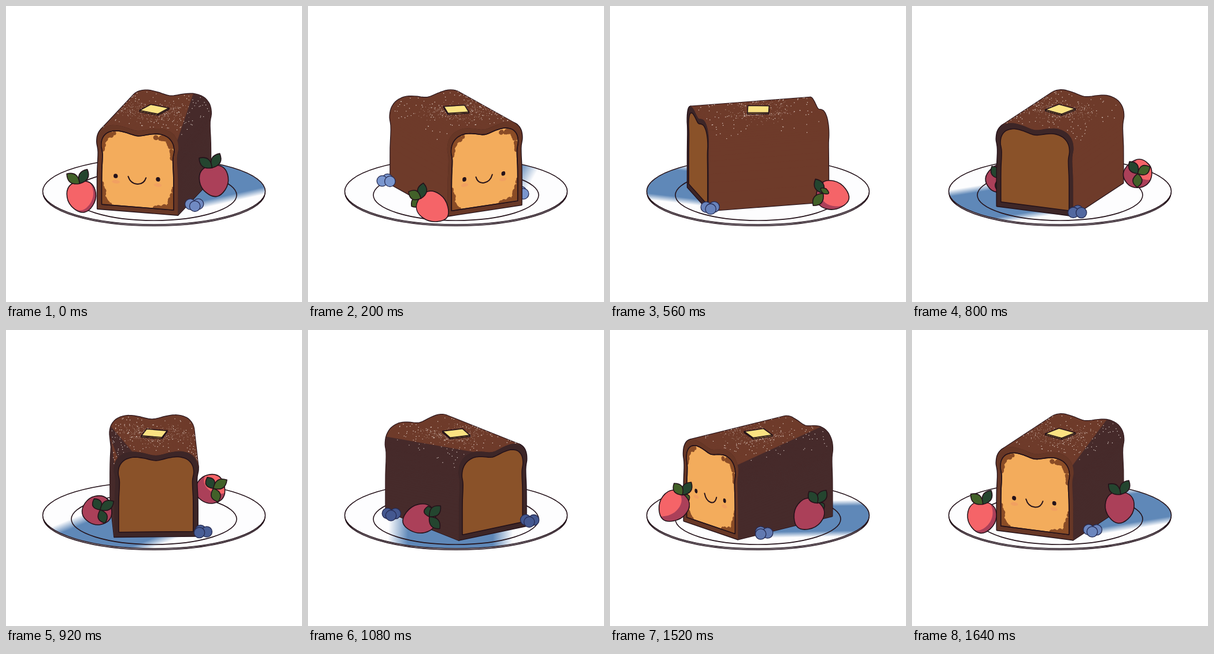
Recreate the animation shown at these times as an HTML page. Size 512 by 512 pixels, loop 1680 ms.

```html
<!DOCTYPE html>
<html lang="en">
<head>
<meta charset="utf-8">
<title>Loaf cake on a plate</title>
<style>
html, body { margin: 0; width: 100%; height: 100%; overflow: hidden; background: #fff; }
svg { display: block; width: 100vw; height: 100vh; }
.ink { stroke: #24121a; stroke-width: 1.6; stroke-linejoin: round; stroke-linecap: round; }
.rim { stroke-width: 2.8; }
.thin { vector-effect: non-scaling-stroke; }
</style>
</head>
<body>
<svg viewBox="0 0 512 512">
  <defs>
    <clipPath id="plateClip"><ellipse cx="256" cy="320.5" rx="192" ry="57"/></clipPath>
    <clipPath id="crumbClip"><path id="crumbShape"/></clipPath>
    <linearGradient id="soft" gradientUnits="userSpaceOnUse" x1="-116" x2="100" y1="0" y2="0">
      <stop offset="0" stop-color="#5f88b8" stop-opacity="0"/>
      <stop offset=".16" stop-color="#5f88b8"/>
      <stop offset=".84" stop-color="#5f88b8"/>
      <stop offset="1" stop-color="#5f88b8" stop-opacity="0"/>
    </linearGradient>
  </defs>
  <ellipse class="ink" cx="256" cy="323" rx="192" ry="57.3" fill="#e9ebf5"/>
  <ellipse cx="256" cy="320.5" rx="192.5" ry="57.5" fill="#fdfdfe"/>
  <g clip-path="url(#plateClip)">
    <g id="shade"><rect x="-116" y="0" width="216" height="320" transform="rotate(-143)" fill="url(#soft)"/></g>
  </g>
  <ellipse class="ink" cx="256" cy="320.5" rx="192.5" ry="57.5" fill="none"/>
  <ellipse class="ink" cx="256" cy="327" rx="143" ry="44" fill="none"/>
  <g id="behind"></g>
  <g id="body"></g>
  <g id="front">
    <path class="ink thin crumb" fill="#f3ac5c"/>
    <g id="toast" fill="#8a4c26" clip-path="url(#crumbClip)"></g>
    <path class="ink thin crumb" fill="none"/>
    <g fill="#f0906a" opacity=".4">
      <ellipse cx="-39" cy="-49" rx="7" ry="3"/><ellipse cx="36" cy="-49" rx="7" ry="3"/>
    </g>
    <g fill="#24121a">
      <circle cx="-39.5" cy="-59" r="3.8"/><circle cx="36.5" cy="-59" r="3.8"/>
    </g>
    <path class="ink thin" style="stroke-width:2" d="M-17-60Q-13-48-1-48T15-60" fill="none"/>
  </g>
  <g id="back"><path class="ink thin crumb" fill="#8a5229"/></g>
  <g id="topping"></g>
  <g id="ahead"></g>
</svg>
<script>
const $ = id => document.getElementById(id);
const TILT = 0.291, RISE = 0.957, CX = 256, CY = 326, HALF = 107, WIDE = 72;
const rad = d => d * Math.PI / 180;
const n1 = v => v.toFixed(1);
const poly = pts => 'M' + pts.map(p => n1(p[0]) + ' ' + n1(p[1])).join('L') + 'Z';

let seed = 7;
const rnd = () => (seed = seed * 16807 % 2147483647) / 2147483647;
const bell = () => (rnd() + rnd() + rnd() - 1.5) * 2;

// Cross-section of the loaf, left base over the two lobes to the right base
const left = [[-WIDE, 0], [-WIDE, 60], [-70.5, 98], [-73, 116], [-70, 131], [-60, 142], [-43, 147], [-24, 145]];
const knots = [...left, [0, 140], ...left.map(p => [-p[0], p[1]]).reverse()];
const SUB = 5;
const profile = [];
for (let i = 0; i < knots.length - 1; i++) {
  const [a, b, c, d] = [-1, 0, 1, 2].map(k => knots[Math.min(Math.max(i + k, 0), knots.length - 1)]);
  for (let j = 0; j < SUB; j++) {
    const t = j / SUB;
    profile.push([0, 1].map(k => b[k] + t * ((c[k] - a[k]) + t * ((2 * a[k] - 5 * b[k] + 4 * c[k] - d[k])
      + t * (3 * b[k] - a[k] - 3 * c[k] + d[k]))) / 2));
  }
}
profile.push(knots[knots.length - 1]);
const LAST = profile.length - 1;

function at(s) {
  const i = Math.min(Math.floor(s), LAST - 1), t = s - i, a = profile[i], b = profile[i + 1];
  return [a[0] + (b[0] - a[0]) * t, a[1] + (b[1] - a[1]) * t];
}

const crumb = poly(profile.map(([u, h]) => [u * 0.895, -8 - h * 0.88]));
$('crumbShape').setAttribute('d', crumb);
document.querySelectorAll('.crumb').forEach(e => e.setAttribute('d', crumb));

// Toasted corners: [side, height, reach across, reach along]
let toast = '';
for (const [u, h, du, dh] of [[-63, 133, 26, 32], [63, 131, 34, 38], [-64, 8, 16, 38], [64, 8, 36, 38]]) {
  for (let i = 0; i < 26; i++) {
    const across = i % 2, k = rnd(), off = rnd() * 9 * (1 - k);
    const x = u - Math.sign(u) * (across ? k * du : off);
    const y = h + (h > 50 ? -1 : 1) * (across ? off : k * dh);
    toast += `<circle cx="${n1(x)}" cy="${n1(-y)}" r="${n1(1.5 + rnd() * 2.5 + (1 - k) * 3)}"/>`;
  }
}
$('toast').innerHTML = toast;

// Sugar: coarse grains all over the top, fine powder near the butter
const grains = [], powder = [];
for (let i = 0; i < 130; i++) grains.push([17 + rnd() * 46, (rnd() * 2 - 1) * 102]);
for (let i = 0; i < 300; i++) powder.push([40 + bell() * 6.5, bell() * 25]);

let phi, cos, sin;
const project = (u, h, f) => [CX + u * cos + f * sin, CY + TILT * (f * cos - u * sin) - h];

function faces(a, b) {
  return (b[0] - a[0]) * TILT + (b[1] - a[1]) * sin * RISE > 0;
}

function skin(from, to) {
  const N = 60;
  let d = '';
  for (let k = 0; k < N; k++) {
    const pick = (s, j) => at(s + (LAST - s) * j / N);
    const a = pick(from, k), b = pick(from, k + 1), c = pick(to, k + 1), e = pick(to, k);
    if (faces(a, b)) {
      d += poly([project(...a, HALF), project(...b, HALF), project(...c, -HALF), project(...e, -HALF)]);
    }
  }
  return d;
}

function drawBody() {
  const isFront = cos > 0, all = skin(0, 0);
  const cap = poly(profile.map(p => project(...p, isFront ? HALF : -HALF)));
  $('body').innerHTML =
    `<path d="${all}" fill="#24121a" class="ink rim"/>` +
    `<path d="${cap}" fill="#24121a" class="ink rim"/>` +
    `<path d="${all}" fill="#6e3b2a" stroke="#6e3b2a" stroke-width=".5"/>` +
    `<path d="${skin(61, 49.5)}" fill="#462b2b" stroke="#462b2b" stroke-width=".5"/>` +
    `<path d="${cap}" fill="${isFront ? '#673726' : '#3d2627'}"/>`;
  for (const [id, dir] of [['front', 1], ['back', -1]]) {
    const g = $(id), c = cos * dir, s = sin * dir;
    g.style.display = c > 0 ? '' : 'none';
    g.setAttribute('transform', `matrix(${c} ${-TILT * s} 0 1 ${CX + HALF * s} ${CY + TILT * HALF * c})`);
  }
}

function dots(list) {
  let d = '';
  for (const [s, f] of list) {
    const i = Math.min(Math.max(Math.floor(s), 0), LAST - 1);
    if (!faces(profile[i], profile[i + 1])) continue;
    const [x, y] = project(...at(s), f);
    d += `M${n1(x)} ${n1(y)}h.1`;
  }
  return d;
}

function drawTopping() {
  const ring = y => [0, 1, 2, 3].map(k => {
    const a = phi + rad(29 + 90 * k);
    return [CX + 0.5 + 26 * Math.sin(a), y + 8.5 * Math.cos(a)];
  });
  const mid = 178.5, top = ring(mid), low = ring(mid + 2.2);
  let sides = '';
  for (let k = 0; k < 4; k++) {
    const j = (k + 1) % 4;
    if (top[k][1] + top[j][1] > 2 * mid) sides += poly([top[k], top[j], low[j], low[k]]);
  }
  $('topping').innerHTML =
    `<path d="${dots(powder)}" stroke="#e9d9cc" stroke-width=".9" stroke-linecap="round" opacity=".6"/>` +
    `<path d="${dots(grains)}" stroke="#f3e8e0" stroke-width="1.4" stroke-linecap="round" opacity=".85"/>` +
    `<path class="ink" d="${sides}" fill="#eebf4c"/><path class="ink" d="${poly(top)}" fill="#fae282"/>`;
}

const flat = v => [v[0], TILT * v[2] - RISE * v[1]];

function place(ang, r, h) {
  const a = phi + rad(ang);
  return [CX + r * Math.sin(a), CY + TILT * r * Math.cos(a) - h];
}

function strawberry({ id, ang, r, h, lit }) {
  const [x, y] = place(ang, r, h);
  const a = phi + rad(-159), sa = Math.sin(a), ca = Math.cos(a);
  const stem = [0.94 * sa, 0.34, 0.94 * ca];
  const side = [ca, 0, -sa], up = [-0.34 * sa, 0.94, -0.34 * ca];
  const axis = flat(stem), len = Math.hypot(...axis);
  const turn = Math.atan2(axis[1], axis[0]) * 180 / Math.PI;
  const k = 23 + 7 * len, q = Math.min(1, len), tip = 13 - 5 * q;
  const edge = s => `${n1(k)} ${s * 16} ${n1(k * 0.7)} ${s * 25} ${n1(5 * q)} ${s * 25}`;
  const shape = `M${n1(k)} 0C${edge(-1)}C${n1(-k * 0.5)} -25 ${n1(-k)} ${n1(-tip)} ${n1(-k)} 0` +
    `C${n1(-k)} ${n1(tip)} ${n1(-k * 0.5)} 25 ${n1(5 * q)} 25C${n1(k * 0.7)} 25 ${n1(k)} 16 ${n1(k)} 0Z`;
  const spin = `translate(${n1(x)} ${n1(y)}) rotate(${n1(turn)})`;

  // Leaves sprout where the stem end shows on the outline of the fruit
  const reach = k * Math.min(0.92, len * (1 - 0.4 * ca)) / len;
  const bx = x + axis[0] * reach, by = y + axis[1] * reach;
  const leaf = (deg, fill) => {
    const g = rad(deg);
    const v = flat(stem.map((c, i) => 0.5 * c + 0.87 * (Math.cos(g) * side[i] + Math.sin(g) * up[i])));
    const m = Math.hypot(...v) || 1, p = [-v[1] / m * 16, v[0] / m * 16];
    const mx = bx + v[0] * 15, my = by + v[1] * 15;
    return `<path class="ink" fill="${fill}" d="M${n1(bx)} ${n1(by)}` +
      `Q${n1(mx + p[0])} ${n1(my + p[1])} ${n1(bx + v[0] * 28)} ${n1(by + v[1] * 28)}` +
      `Q${n1(mx - p[0])} ${n1(my - p[1])} ${n1(bx)} ${n1(by)}Z"/>`;
  };
  const dark = '#24452f', olive = lit ? '#426129' : dark;
  const under = leaf(270, olive), over = leaf(125, dark) + leaf(28, olive);

  let fruit = `<path d="${shape}" transform="${spin}" fill="#ab4059"/>`;
  if (lit) {
    const away = phi + rad(143), m = 18 * (1 + Math.cos(away));
    const move = `translate(${n1(-0.8 * m * Math.sin(away))} ${n1(-0.5 * m)}) `;
    fruit += `<clipPath id="${id}"><path d="${shape}" transform="${spin}"/></clipPath>` +
      `<g clip-path="url(#${id})"><path d="${shape}" transform="${move + spin}" fill="#f56468"/></g>`;
  }
  fruit += `<path class="ink" d="${shape}" transform="${spin}" fill="none"/>`;
  return (ca > -0.4 ? fruit + under : under + fruit) + over;
}

function blueberries({ ang, r }) {
  const [x, y] = place(ang, r, 7.5);
  const t = (1 - Math.cos(phi + rad(143))) / 2;
  const mix = (a, b) => Math.round(a + (b - a) * t);
  const fill = `rgb(${mix(68, 122)},${mix(88, 150)},${mix(144, 206)})`;
  return [20, 140, 260].map(d => {
    const a = phi + rad(d);
    return [x + 8 * Math.sin(a), y + 8 * TILT * Math.cos(a)];
  }).sort((a, b) => a[1] - b[1]).map(([bx, by]) =>
    `<circle cx="${n1(bx)}" cy="${n1(by)}" r="9.2" fill="${fill}" stroke="#262b52" stroke-width="1.3"/>`).join('');
}

const fruits = [
  { draw: strawberry, id: 'berry', ang: -43, r: 147, h: 18.5, lit: true },
  { draw: strawberry, id: 'dim', ang: 106, r: 104, h: 23, lit: false },
  { draw: blueberries, ang: 54, r: 112 },
  { draw: blueberries, ang: 217, r: 133 }
];

// A fruit covers the loaf when it lies outside a side that can be seen
function isAhead({ ang, r }) {
  const u = r * Math.sin(rad(ang)), f = r * Math.cos(rad(ang));
  return (Math.abs(f) > HALF - 2 && f * cos > 30) || (Math.abs(u) > WIDE && u * sin < 0);
}

function draw(step) {
  phi = rad(-15.3 + step * 360 / 42);
  cos = Math.cos(phi);
  sin = Math.sin(phi);
  $('shade').setAttribute('transform', `matrix(${cos} ${-TILT * sin} ${sin} ${TILT * cos} ${CX} ${CY})`);
  drawBody();
  drawTopping();
  const depth = o => Math.cos(phi + rad(o.ang)) * o.r;
  const sorted = [...fruits].sort((a, b) => depth(a) - depth(b));
  const paint = list => list.map(o => o.draw(o)).join('');
  $('behind').innerHTML = paint(sorted.filter(o => !isAhead(o)));
  $('ahead').innerHTML = paint(sorted.filter(isAhead));
}

const begin = performance.now();
let shown = -1;
function tick() {
  const step = Math.floor((performance.now() - begin) / 40) % 42;
  if (step !== shown) draw(shown = step);
  requestAnimationFrame(tick);
}
tick();
</script>
</body>
</html>
```
